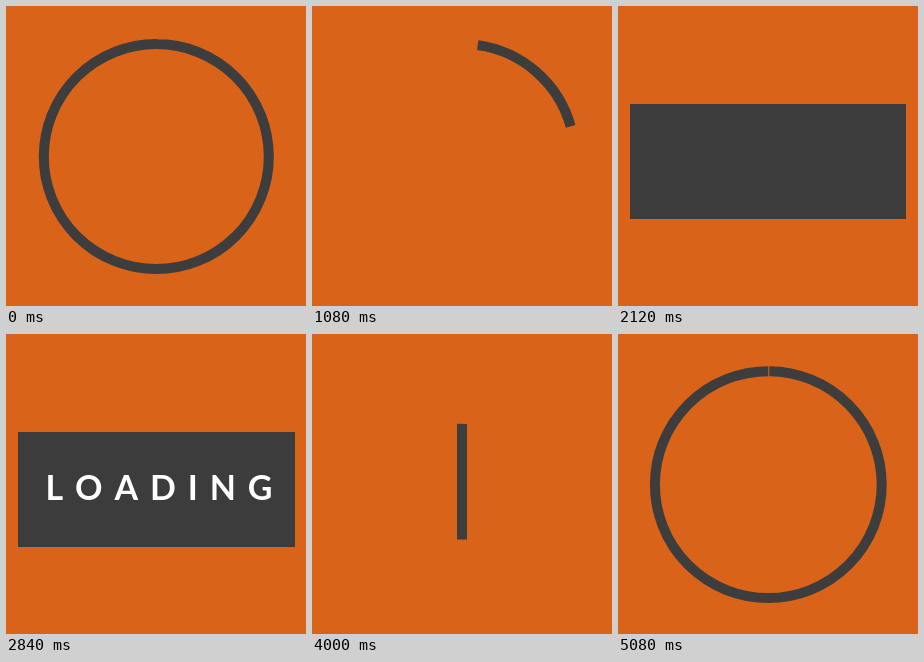
Animation of 300x300 px, one loop 5120 ms. Source, as an HTML page:

```html
<!DOCTYPE html>
<html lang="en">
<head>
<meta charset="utf-8">
<title>Loading</title>
<style>
  html, body { margin: 0; width: 100%; height: 100%; overflow: hidden; background: #d96318; }
  svg { position: absolute; left: 0; top: 0; }
  path { fill: none; stroke: #3d3d3d; stroke-width: 10; }
  #box { position: absolute; top: 97.5px; height: 115px; overflow: hidden; background: #3c3c3c; }
  #label {
    position: absolute; top: 35.5px; white-space: nowrap; color: #fff;
    font: 700 34px/40px Lato, sans-serif; letter-spacing: 11.9px;
  }
  #label span { display: inline-block; }
</style>
</head>
<body>
<svg width="300" height="300"><path id="inward"/><path id="outward"/></svg>
<div id="box"><div id="label"></div></div>
<script>
const LOOP = 5120, STEP = 40;
const MID = 150, TOP = 97.5, BOTTOM = 212.5, BAR = BOTTOM - TOP;
const CX = 150.3, CY = 150.6;
const R_IN = 112.5, R_OUT = 113.4;

const $ = id => document.getElementById(id);
const inward = $('inward'), outward = $('outward'), box = $('box'), label = $('label');

// Clockwise quarter arcs, starting after the given quarter (0 = right, -1 = top).
function quarters(r, from, count) {
  let d = '';
  for (let i = 1; i <= count; i++) {
    const a = (from + i) * Math.PI / 2;
    d += `A${r} ${r} 0 0 1 ${CX + r * Math.cos(a)} ${CY + r * Math.sin(a)}`;
  }
  return d;
}

// The ring winds down into the upright bar, and later unwinds from it.
const rightIn = CX + R_IN, rightOut = CX + R_OUT;
inward.setAttribute('d', `M${CX} ${CY - R_IN}` + quarters(R_IN, -1, 9) +
  `C${rightIn} 272 ${MID} 272 ${MID} 208V${TOP}`);
outward.setAttribute('d', `M${MID} ${BOTTOM}V92C${MID} 28 ${rightOut} 28 ${rightOut} ${CY}` +
  quarters(R_OUT, 0, 7));

// Smooth monotone curve through [time, value] keys, at rest at both ends.
function curve(keys) {
  const n = keys.length;
  const rate = i => (keys[i + 1][1] - keys[i][1]) / (keys[i + 1][0] - keys[i][0]);
  const slope = keys.map((k, i) => {
    if (i === 0 || i === n - 1) return 0;
    const a = rate(i - 1), b = rate(i);
    return a * b > 0 ? 2 * a * b / (a + b) : 0;
  });
  return t => {
    if (t <= keys[0][0]) return keys[0][1];
    if (t >= keys[n - 1][0]) return keys[n - 1][1];
    let i = 0;
    while (t >= keys[i + 1][0]) i++;
    const [t0, v0] = keys[i], [t1, v1] = keys[i + 1];
    const h = t1 - t0, p = (t - t0) / h, q = 1 - p;
    return v0 * (1 + 2 * p) * q * q + slope[i] * h * p * q * q +
           v1 * p * p * (3 - 2 * p) - slope[i + 1] * h * p * p * q;
  };
}

const lenIn = inward.getTotalLength(), lenOut = outward.getTotalLength();
const ringIn = 2 * Math.PI * R_IN, ringOut = 2 * Math.PI * R_OUT;

const tailIn = curve([[90, 0], [680, 825], [1200, 1551], [1640, lenIn - BAR - 4], [1760, lenIn - BAR]]);
const headIn = curve([[90, ringIn], [680, 1031], [1200, 1680], [1640, lenIn - 4], [1760, lenIn]]);
const tailOut = curve([[3920, 0], [4000, 7], [4240, 185], [4800, lenOut - ringOut - 4], [5080, lenOut - ringOut]]);
const headOut = curve([[3920, BAR], [4000, BAR + 7], [4240, 310], [4800, lenOut - 141], [5080, lenOut]]);
const width = curve([[1760, 10], [2000, 288], [2120, 276], [2240, 277], [3700, 277], [3930, 10]]);
const textOut = curve([[3700, 1], [3840, 0]]);

const letters = [...'LOADING'].map((c, i) => {
  const span = document.createElement('span');
  span.textContent = c;
  label.append(span);
  const start = 2300 + i * 30;
  return { span, show: curve([[start, 0], [start + 360, 1]]) };
});

function trim(path, tail, head, visible) {
  path.style.display = visible ? '' : 'none';
  path.style.strokeDasharray = `0 ${tail} ${head - tail + 0.5} 9999`;
}

function draw(t) {
  const boxed = t >= 1780 && t < 3940;
  trim(inward, tailIn(t), headIn(t), t < 1780);
  trim(outward, tailOut(t), headOut(t), t >= 3940);

  const w = width(t), left = MID - w / 2;
  box.style.display = boxed ? '' : 'none';
  box.style.left = left + 'px';
  box.style.width = w + 'px';
  label.style.left = 39.5 - left + 'px';
  label.style.opacity = textOut(t);
  for (const { span, show } of letters) {
    const p = show(t);
    span.style.opacity = p;
    span.style.transform = `translateY(${9 * (1 - p)}px)`;
  }
}

const begin = performance.now();
function tick() {
  const t = (performance.now() - begin) % LOOP;
  draw(Math.floor(t / STEP) * STEP);
  requestAnimationFrame(tick);
}
tick();
</script>
</body>
</html>
```
